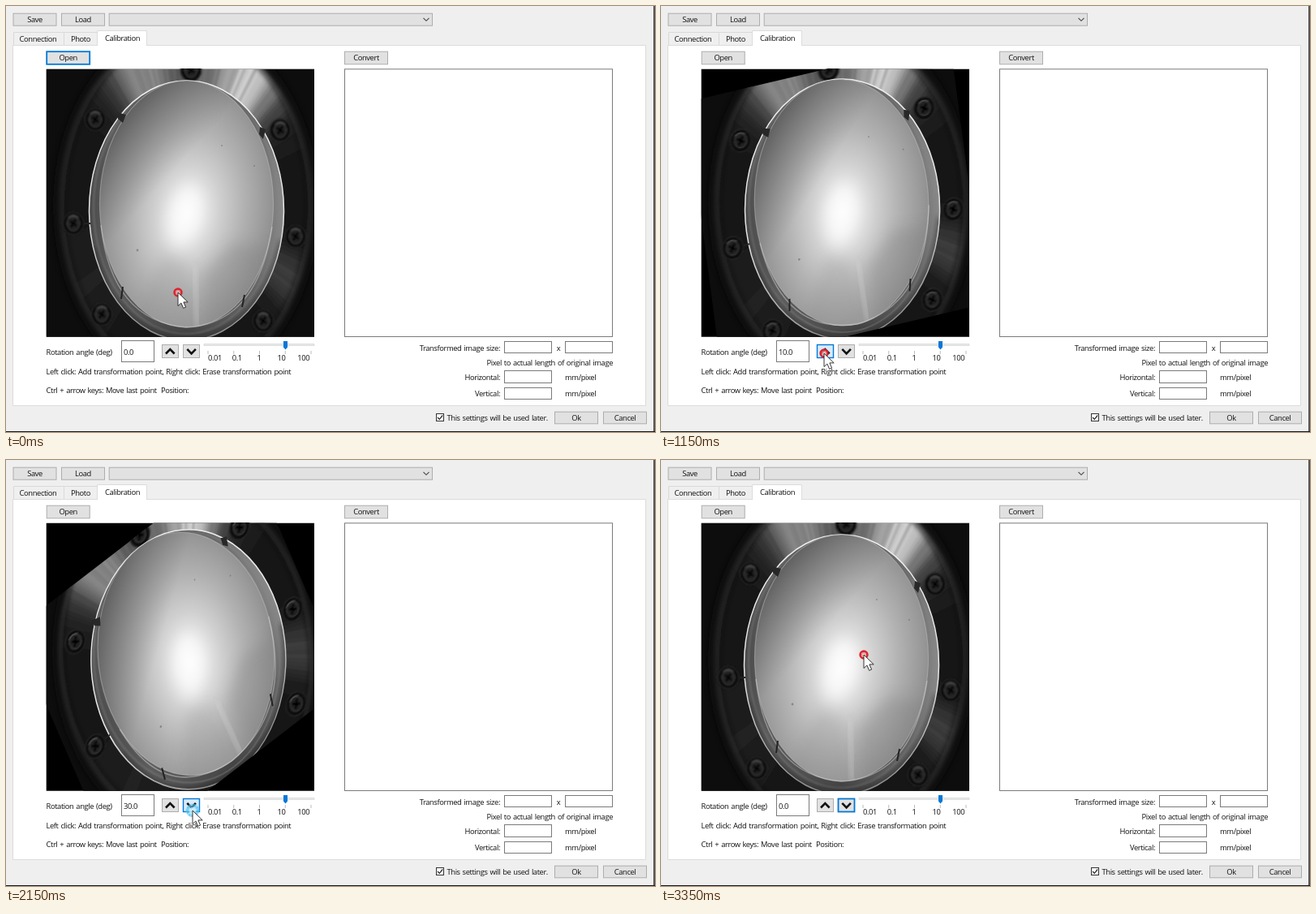
Animation, 800 px wide and 525 px high, one loop 3.4 s. Source, as an HTML page:

```html
<!DOCTYPE html>
<html lang="en">
<head>
<meta charset="utf-8">
<title>Calibration</title>
<style>
html, body { margin: 0; width: 100%; height: 100%; overflow: hidden; background: #f0eff0; }
svg { display: block; width: 800px; height: 525px; }
text { font: 9.4px "Open Sans", "Noto Sans", sans-serif; letter-spacing: -.4px; word-spacing: .9px; fill: #111; white-space: pre; }
.mid { text-anchor: middle; }
.end { text-anchor: end; }
.btn { fill: #e1e1e1; stroke: #adadad; }
.field { fill: #fff; stroke: #7a7a7a; }
.focus { stroke: #0078d7; stroke-width: 1.8; }
.hover { fill: #d8ebfa; stroke: #0078d7; stroke-width: 1.4; }
.chev { fill: none; stroke: #111; stroke-width: 2.6; }
</style>
</head>
<body>
<svg viewBox="0 0 800 525">
  <defs>
    <clipPath id="view"><rect x="49.7" y="77.7" width="330.3" height="330"/></clipPath>
    <clipPath id="glass"><ellipse cx="222.5" cy="244" rx="107" ry="152"/></clipPath>
    <clipPath id="well"><ellipse cx="222.5" cy="252" rx="120" ry="160"/></clipPath>
    <radialGradient id="glow" gradientUnits="userSpaceOnUse" cx="0" cy="0" r="1" gradientTransform="translate(223 256) rotate(9) scale(125 190)">
      <stop offset="0" stop-color="#fafafa"/><stop offset=".13" stop-color="#eee"/>
      <stop offset=".32" stop-color="#d0d0d0"/><stop offset=".55" stop-color="#b2b2b2"/>
      <stop offset=".8" stop-color="#969696"/><stop offset="1" stop-color="#7c7c7c"/>
    </radialGradient>
    <linearGradient id="shade" gradientUnits="userSpaceOnUse" x1="130" y1="120" x2="214" y2="196">
      <stop offset="0" stop-color="#222" stop-opacity=".45"/>
      <stop offset=".45" stop-color="#222" stop-opacity=".24"/>
      <stop offset="1" stop-color="#222" stop-opacity="0"/>
    </linearGradient>
    <linearGradient id="wall" x1="0" y1="0" x2="1" y2="0">
      <stop offset="0" stop-color="#4a4a4a"/><stop offset=".12" stop-color="#5c5c5c"/>
      <stop offset=".5" stop-color="#444"/><stop offset=".85" stop-color="#666"/><stop offset="1" stop-color="#8a8a8a"/>
    </linearGradient>
    <linearGradient id="rim" x1="0" y1="0" x2="0" y2="1">
      <stop offset="0" stop-color="#eee"/><stop offset=".55" stop-color="#e6e6e6"/><stop offset="1" stop-color="#888"/>
    </linearGradient>
    <filter id="soft" x="-50%" y="-50%" width="200%" height="200%"><feGaussianBlur stdDeviation="9"/></filter>
    <filter id="blur" x="-30%" y="-30%" width="160%" height="160%"><feGaussianBlur stdDeviation="3"/></filter>
    <filter id="smooth" x="-10%" y="-10%" width="120%" height="120%"><feGaussianBlur stdDeviation=".8"/></filter>
  </defs>

  <rect width="800" height="525" fill="#f0eff0"/>
  <g id="ui"></g>

  <g clip-path="url(#view)">
    <rect x="49" y="77" width="332" height="332" fill="#000"/>
    <g id="photo"><g clip-path="url(#view)">
      <rect x="49" y="77" width="332" height="332" fill="#0d0d0d"/>
      <g id="flange" filter="url(#smooth)"></g>
      <ellipse cx="222" cy="246" rx="157" ry="217" fill="none" stroke="#0b0b0b" stroke-width="14" opacity=".75" filter="url(#blur)"/>
      <ellipse cx="222" cy="246" rx="154" ry="214" fill="none" stroke="#505050" stroke-width="3" opacity=".7" filter="url(#blur)"/>
      <g id="screws" filter="url(#smooth)"></g>
      <ellipse cx="222.5" cy="252" rx="120" ry="160" fill="url(#wall)"/>
      <g clip-path="url(#well)" fill="none">
        <ellipse cx="222" cy="248" rx="114" ry="156" stroke="#888" stroke-width="1.5" opacity=".6" filter="url(#smooth)"/>
        <path d="M106 300Q135 406 222 410Q312 406 340 290" stroke="#1c1c1c" stroke-width="6" opacity=".55" filter="url(#blur)"/>
      </g>
      <ellipse cx="222.5" cy="252" rx="120" ry="160" fill="none" stroke="url(#rim)" stroke-width="1.5"/>
      <g clip-path="url(#glass)">
        <rect x="110" y="88" width="230" height="312" fill="url(#glow)"/>
        <rect x="110" y="88" width="230" height="312" fill="url(#shade)"/>
        <path d="M150 400L194 306L224 318L234 400Z" fill="#888" opacity=".25" filter="url(#soft)"/>
        <path d="M242 330L280 292L330 300L290 400H244Z" fill="#777" opacity=".28" filter="url(#soft)"/>
        <ellipse cx="220" cy="258" rx="17" ry="38" fill="#fff" opacity=".6" filter="url(#soft)" transform="rotate(14 220 258)"/>
        <path d="M232 320L236 395" stroke="#ddd" stroke-width="6" opacity=".35" filter="url(#blur)"/>
      </g>
      <ellipse cx="222.5" cy="244" rx="107" ry="152" fill="none" stroke="#c4c4c4" stroke-width="1.2" opacity=".45"/>
      <path d="M117 270Q130 388 222 396Q310 392 328 272" fill="none" stroke="#ddd" stroke-width="1.4" opacity=".45"/>
      <path d="M137 131L148 134L144 144L138 139ZM313 149L320 152L317 164L312 158Z" fill="#282828"/>
      <path d="M144 346L142 361M294 356L291 371M97 268H104" stroke="#222" stroke-width="2"/>
      <circle cx="162" cy="301" r="1.4" fill="#888"/>
      <circle cx="266" cy="172" r="1" fill="#8c8c8c"/>
      <circle cx="306" cy="197" r="1" fill="#808080"/>
    </g></g>
  </g>

  <g id="cursor">
    <g id="press">
      <circle r="8.5" fill="#6fd0f5" opacity=".55"/>
      <circle r="6.5" fill="none" stroke="#2fb4e8" stroke-width="2.2" stroke-dasharray="2 1.2" opacity=".55"/>
      <circle r="4" fill="#dcf4fd" opacity=".7"/>
    </g>
    <g id="idle">
      <circle r="4.4" fill="#f6dede" fill-opacity=".6" stroke="#dc2430" stroke-width="2.6"/>
      <circle r="2.2" fill="none" stroke="#d77" stroke-width="1"/>
    </g>
    <path d="M0 0V16.6L3.9 13L6.6 19.4L9.6 18.1L6.9 11.9H12.2Z" fill="#fff" stroke="#222" stroke-width=".9"/>
  </g>
  <path d="M799 0V525M0 524.6H800" stroke="#161616" stroke-width="1.4"/>
</svg>
<script>
const $ = id => document.getElementById(id);

function add(parent, tag, attrs, label) {
  const el = document.createElementNS("http://www.w3.org/2000/svg", tag);
  for (const key in attrs) el.setAttribute(key, attrs[key]);
  if (label !== undefined) el.textContent = label;
  parent.appendChild(el);
  return el;
}

const ui = $("ui");
const box = (x, y, r, b, cls) =>
  add(ui, "rect", { x: x + .5, y: y + .5, width: r - x - 1, height: b - y - 1, class: cls });
const text = (x, y, label, cls = "") => add(ui, "text", { x, y, class: cls }, label);
const path = (d, stroke, width = 1, fill = "none") =>
  add(ui, "path", { d, stroke, fill, "stroke-width": width });

function button(x, y, r, b, label) {
  const face = box(x, y, r, b, "btn");
  text((x + r) / 2, (y + b) / 2 + 3.3, label, "mid");
  return face;
}

// Window
button(8.5, 8.7, 62.5, 24.7, "Save");
button(68, 8.7, 122, 24.7, "Load");
box(126.7, 8.7, 526, 24.7, "btn");
path("M514.5 14.8L518 18.3L521.5 14.8", "#444", 1.1);
path("M9.5 48V32.5H71.5V48M71.5 32.5H112.5", "#d9d9d9");
path("M8.5 48.5H788.5V492.5H8.5Z", "#dcdcdc", 1, "#fff");
path("M112.5 49V30.5H173.5V49", "#dcdcdc", 1, "#fff");
text(39.5, 43.5, "Connection", "mid");
text(92, 43.5, "Photo", "mid");
text(143.5, 43, "Calibration", "mid");
const openBtn = button(49.7, 55.7, 103.7, 72.3, "Open");
button(417, 55.7, 471, 72.3, "Convert");
box(417, 77.3, 748, 408, "field");

// Rotation controls
text(49.5, 429.5, "Rotation angle (deg)");
box(142, 412, 183, 439, "field");
const angleText = text(145, 429.5, "0.0");
const upBtn = box(192, 417, 213, 434, "btn");
const downBtn = box(218, 417, 239, 434, "btn");
add(ui, "path", { d: "M197 428.5L202.3 423L207.6 428.5", class: "chev" });
add(ui, "path", { d: "M223.3 422.8L228.6 428.3L233.9 422.8", class: "chev" });
path("M244 416.5H380V418.5H244Z", "#d6d6d6", .7, "#e7eaea");
path("M342 413H347V420.5L344.5 423.5L342 420.5Z", "none", 0, "#0078d7");
["0.01", "0.1", "1", "10", "100"].forEach((label, i) => {
  const x = 249 + i * 31.75;
  path(`M${x} 425V429`, "#bbb");
  text(257.5 + i * 27.3, 437, label, "mid");
});
text(49.5, 453.5, "Left click: Add transformation point, Right click: Erase transformation point");
text(49.5, 476.5, "Ctrl + arrow keys: Move last point");
text(191, 476.5, "Position:");

// Result fields
text(609, 424.5, "Transformed image size:", "end");
box(614, 413, 673, 428, "field");
text(681, 424.5, "x", "mid");
box(689, 413, 748, 428, "field");
text(748, 443, "Pixel to actual length of original image", "end");
text(609, 461, "Horizontal:", "end");
box(614, 449, 673, 465, "field");
text(689, 461, "mm/pixel");
text(609, 481, "Vertical:", "end");
box(614, 470, 673, 485, "field");
text(689, 481, "mm/pixel");
box(530, 502, 540, 512, "field").style.stroke = "#333";
path("M532 507L534.3 509.3L538.2 504.5", "#222", 1.2);
text(543.5, 510.8, "This settings will be used later.");
button(676, 499.7, 730, 515.3, "Ok");
button(736, 499.7, 790, 515.3, "Cancel");

// Brushed metal: wedges shaded by their angle from the top
let seed = 7;
const rand = () => (seed = seed * 16807 % 2147483647) / 2147483647;
const bump = (a, mid, width, height) => height * Math.exp(-(((a - mid) / width) ** 2));
const STEP = 1.5;
for (let a = -180; a < 180; a += STEP) {
  const light = bump(a, 33, 17, 165) + bump(a, -25, 16, 115) + bump(a, 5, 16, 60)
    + bump(a, 116, 10, 36) + bump(a, -120, 16, 8);
  const v = Math.round(Math.min(225, 24 + light * (.88 + .24 * rand())));
  const at = d => {
    const r = d * Math.PI / 180;
    return `${(222 + 155 * Math.sin(r)).toFixed(1)} ${(246 - 215 * Math.cos(r)).toFixed(1)}`;
  };
  add($("flange"), "path", { d: `M222 246L${at(a)}L${at(a + STEP + .4)}Z`, fill: `rgb(${v},${v},${v})` });
}

[[110, 140], [338, 153], [83, 268], [357, 284], [118, 380], [317, 388], [228, 79]].forEach(([x, y]) => {
  const g = add($("screws"), "g", { transform: `translate(${x} ${y})` });
  add(g, "ellipse", { rx: 13, ry: 14, fill: "#101010", stroke: "#2c2c2c", "stroke-width": 1 });
  add(g, "ellipse", { rx: 7.5, ry: 9, fill: "#202020", stroke: "#444", "stroke-width": 1 });
  add(g, "path", { d: "M-4 -3L4 3M-3 5L3 -5", stroke: "#050505", "stroke-width": 2.4 });
  add(g, "path", { d: "M-6 -7Q0 -12 6 -7", stroke: "#666", fill: "none", "stroke-width": 1 });
});

// Time line, in ms
const LOOP = 3400, TICK = 50;
const moves = [[0, 212, 353], [400, 201, 428], [1800, 201, 428], [2000, 230, 432],
  [3250, 230, 432], [3300, 233, 417], [3350, 250, 240]];
const turns = [[750, 10], [1200, 20], [1700, 30], [2300, 20], [2650, 10], [3000, 0]];
const presses = [[550, 700], [1050, 1150], [1450, 1650], [2100, 2250], [2500, 2600], [2850, 2950]];
const UP_FOCUS = 550, DOWN_FOCUS = 2100;

function pointer(t) {
  const i = moves.findIndex(m => m[0] > t);
  if (i < 0) return moves[moves.length - 1].slice(1);
  const [t0, x0, y0] = moves[i - 1], [t1, x1, y1] = moves[i];
  const k = (t - t0) / (t1 - t0), e = k * k * (3 - 2 * k);
  return [x0 + (x1 - x0) * e, y0 + (y1 - y0) * e];
}

function setState(face, focused, hovered) {
  face.setAttribute("class", "btn" + (focused ? " focus" : "") + (hovered ? " hover" : ""));
}

function draw(t) {
  const [x, y] = pointer(t);
  const angle = turns.reduce((a, [at, value]) => t >= at ? value : a, 0);
  const pressed = presses.some(([from, to]) => t >= from && t < to);
  const over = left => x >= left && x <= left + 21 && y >= 417 && y <= 434;
  // The picture turns in 4:3 space and is then squeezed to a square.
  $("photo").setAttribute("transform",
    `translate(215 243) scale(.75 1) rotate(${-angle}) scale(${4 / 3} 1) translate(-215 -243)`);
  angleText.textContent = angle.toFixed(1);
  setState(openBtn, t < UP_FOCUS, false);
  setState(upBtn, t >= UP_FOCUS && t < DOWN_FOCUS, over(192));
  setState(downBtn, t >= DOWN_FOCUS, over(218));
  $("cursor").setAttribute("transform", `translate(${x.toFixed(1)} ${y.toFixed(1)})`);
  $("press").style.display = pressed ? "" : "none";
  $("idle").style.display = pressed ? "none" : "";
}

let start, last = -1;
function frame() {
  const now = performance.now();
  if (start === undefined) start = now;
  const t = Math.floor((now - start) % LOOP / TICK) * TICK;
  if (t !== last) draw(last = t);
  requestAnimationFrame(frame);
}
draw(0);
requestAnimationFrame(frame);
</script>
</body>
</html>
```
